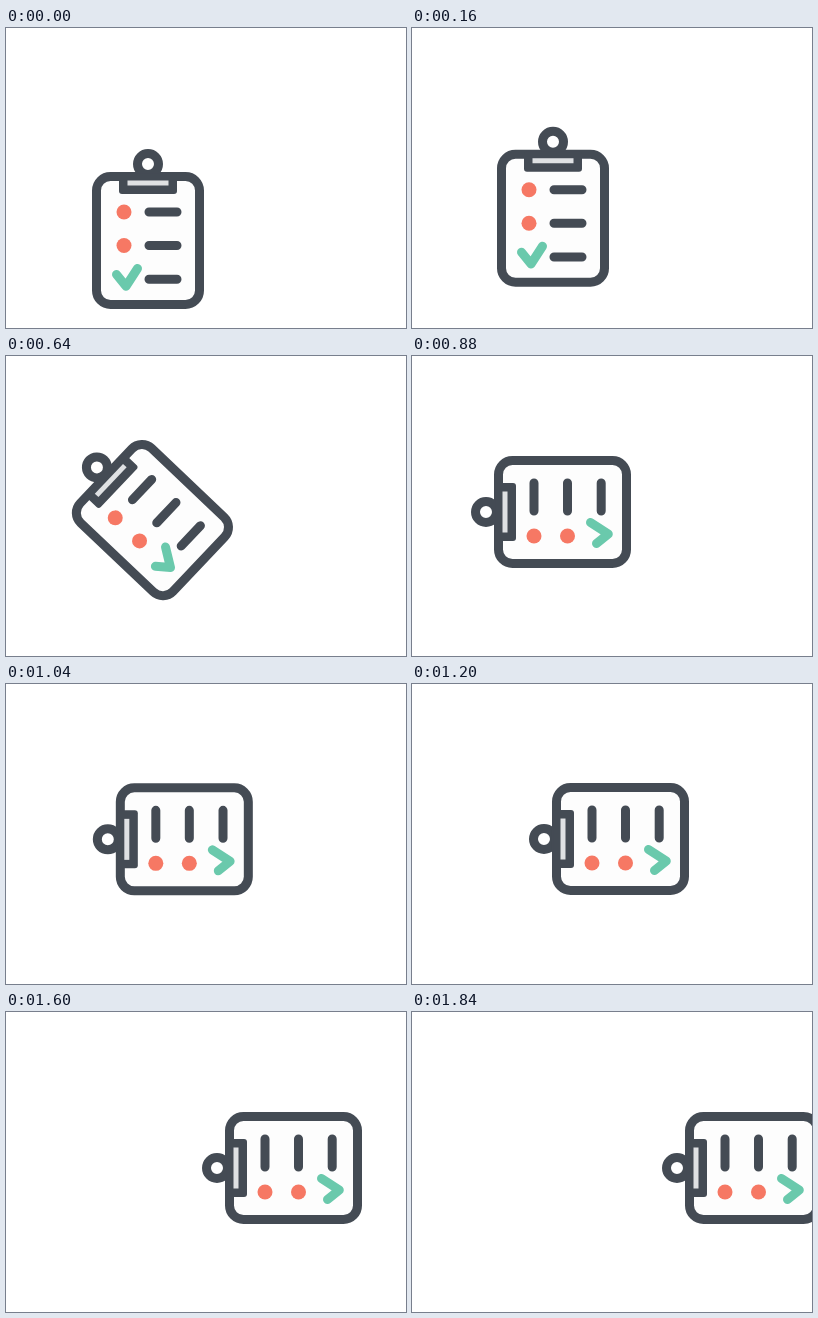
Recreate the animation shown at these times as an HTML page. Size 400 px wide and 300 px high, loop 1.92 s.

```html
<!DOCTYPE html>
<html lang="en">
<head>
<meta charset="utf-8">
<title>Clipboard</title>
<style>
  html, body { margin: 0; width: 100%; height: 100%; overflow: hidden; background: #fff; }
  svg { display: block; width: 100%; height: 100%; }
  .line { fill: none; stroke: #444b54; stroke-width: 9; stroke-linecap: round; stroke-linejoin: round; }
</style>
</head>
<body>
<svg viewBox="0 0 400 300">
  <g id="board">
    <circle class="line" cy="-76.5" r="10.5"/>
    <rect class="line" x="-51.5" y="-64" width="103" height="128" rx="14" style="fill:#fdfdfd"/>
    <rect x="-29" y="-67" width="58" height="20.5" rx="3" fill="#444b54"/>
    <rect x="-20.5" y="-60" width="41" height="5" fill="#dfe1e3"/>
    <g fill="#f67864">
      <circle cx="-24" cy="-28.5" r="7.5"/>
      <circle cx="-24" cy="5" r="7.5"/>
    </g>
    <path class="line" d="M1-28.5h28M1 5h28M1 38.7h28"/>
    <path class="line" d="M-31.5 34L-22 45.8L-10.5 28" style="stroke:#6ac9ac"/>
  </g>
</svg>
<script>
  const STEP = 80, STEPS = 24;
  const board = document.getElementById('board');

  const ramp = (t, from, to) => Math.min(1, Math.max(0, (t - from) / (to - from)));
  const smooth = p => (1 - Math.cos(Math.PI * p)) / 2;

  function draw() {
    const step = Math.floor(performance.now() / STEP) % STEPS;
    const lift = ramp(step, 0, 4);
    const turn = ramp(step, 4, 11);
    const slide = ramp(step, 11, 20);
    const dash = ramp(step, 20, 23);

    const x = 142 - 2 * lift + 10.5 * smooth(turn) + 137 * slide ** 1.06 + 54 * dash;
    const y = 212.5 - 44.5 * lift - 12 * turn ** 2 - Math.sin(Math.PI * slide);
    const angle = -90 * turn ** 1.18;

    board.setAttribute('transform', `translate(${x} ${y}) rotate(${angle})`);
    requestAnimationFrame(draw);
  }
  draw();
</script>
</body>
</html>
```
